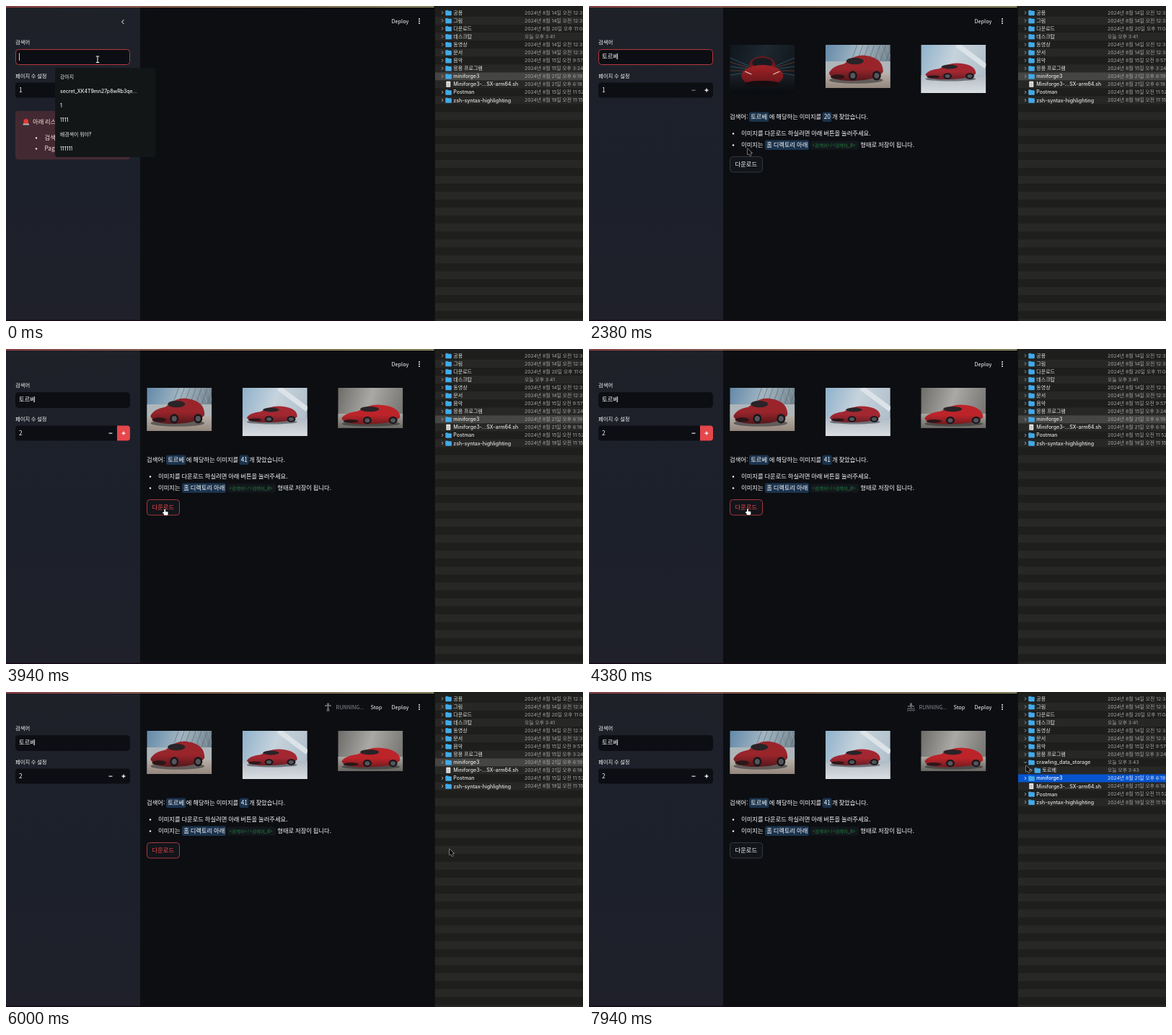
An HTML page with a canvas for the animation above (8000 ms loop, 800 px wide and 438 px high).

```html
<!DOCTYPE html>
<html lang="ko">
<head>
<meta charset="utf-8">
<style>
html, body { margin: 0; width: 100%; height: 100%; overflow: hidden; background: #0d0f14; }
canvas { display: block; width: 800px; height: 438px; }
</style>
</head>
<body>
<canvas id="stage"></canvas>
<script>
const W = 800, H = 438, LOOP = 8000;
const canvas = document.getElementById('stage');
const dpr = window.devicePixelRatio || 1;
canvas.width = W * dpr;
canvas.height = H * dpr;
const g = canvas.getContext('2d');
const APP = '"Noto Sans CJK KR", "Noto Sans CJK", sans-serif';
const SYS = 'Inter, "Noto Sans CJK KR", "Noto Sans CJK", sans-serif';
const MONO = '"Noto Sans Mono", "Noto Sans CJK KR", monospace';
const WHITE = '#fafafa', FIELD = '#0c0e13', BADGE = '#1b334d';
const QUERY = '토르베', STORE = 'crawling_data_storage';

// Event times in ms
const AT = { type: 120, submit: 1000, found: 1900, plus: 2900, more: 3750, download: 4550, folder: 6800, expand: 7500 };
const KEY_MS = 115;
const typed = ['', 'ㅌ', '토', '톨', '토르', '토릅', QUERY];

// Each move: start, end, goal
const moves = [
  [500, 1000, 166, 125], [1750, 2300, 220, 198], [2400, 2750, 165, 122], [3100, 3370, 225, 230],
  [3600, 4000, 220, 222], [4750, 5400, 640, 236], [5630, 6000, 615, 218], [6100, 7200, 606, 102]
];

const clamp = (v, lo, hi) => Math.max(lo, Math.min(hi, v));
const smooth = p => p * p * (3 - 2 * p);
function pointer(t) {
  const p = { x: 127, y: 74 };
  for (const [from, to, x, y] of moves) {
    const e = smooth(clamp((t - from) / (to - from), 0, 1));
    p.x += (x - p.x) * e;
    p.y += (y - p.y) * e;
  }
  return p;
}
const inside = (p, x, y, w, h) => p.x >= x && p.x <= x + w && p.y >= y && p.y <= y + h;

function rect(x, y, w, h, fill) { g.fillStyle = fill; g.fillRect(x, y, w, h); }
function round(x, y, w, h, r, fill, stroke) {
  g.beginPath();
  g.roundRect(x, y, w, h, r);
  g.fillStyle = fill;
  g.fill();
  if (stroke) { g.strokeStyle = stroke; g.lineWidth = 1; g.stroke(); }
}
function oval(x, y, rx, ry, fill) {
  g.beginPath();
  g.ellipse(x, y, rx, ry, 0, 0, 7);
  g.fillStyle = fill;
  g.fill();
}
const disc = (x, y, r, fill) => oval(x, y, r, r, fill);
function line(points, color, width) {
  g.beginPath();
  points.forEach(([x, y]) => g.lineTo(x, y));
  g.strokeStyle = color;
  g.lineWidth = width;
  g.stroke();
}
function chevron(x, y, r, angle, color) {
  g.save();
  g.translate(x, y);
  g.rotate(angle);
  line([[-r / 2, -r], [r / 2, 0], [-r / 2, r]], color, 1);
  g.restore();
}
// y is the vertical middle of the text
function text(s, x, y, size = 8.3, color = WHITE, family = APP, weight = 400) {
  g.font = `${weight} ${size}px ${family}`;
  g.fillStyle = color;
  g.fillText(s, x, y + size * 0.36);
}
function gradient(x0, y0, x1, y1, ...colors) {
  const f = g.createLinearGradient(x0, y0, x1, y1);
  colors.forEach((c, i) => f.addColorStop(i / (colors.length - 1), c));
  return f;
}

// Photos: soft backdrops 90 px wide with a simple car
function car(x, y, w, h, top, bottom) {
  g.save();
  g.translate(x, y);
  g.scale(w, h);
  oval(.5, .9, .5, .12, 'rgba(30,30,34,.5)');
  g.beginPath();
  g.moveTo(0, .65);
  g.quadraticCurveTo(.05, .4, .28, .32);
  g.quadraticCurveTo(.48, -.05, .7, .03);
  g.quadraticCurveTo(1, .12, 1, .6);
  g.quadraticCurveTo(.9, .9, .45, .92);
  g.quadraticCurveTo(.05, .95, 0, .65);
  g.fillStyle = gradient(0, 0, 0, 1, top, top, bottom);
  g.fill();
  oval(.48, .22, .16, .12, '#2a2327');
  oval(.16, .78, .13, .08, '#2c1518');
  for (const wheel of [.44, .88]) {
    oval(wheel, .74, 6 / w, .17, '#17171b');
    oval(wheel, .74, 3.5 / w, .1, '#55555b');
  }
  g.restore();
}
function backdrop(h, floor, wall, ground) {
  rect(0, 0, 90, h, gradient(0, 0, 90, h / 2, ...wall));
  rect(0, floor, 90, h - floor, gradient(0, floor, 0, h, ...ground));
}
function nightPhoto(h) {
  backdrop(h, 42, ['#10161d', '#1d2830', '#12171d'], ['#1a2027', '#090b0e']);
  for (let i = 0; i < 5; i++) {
    const y = 18 + i * 6, color = i % 2 ? '#6d3a30' : '#36586b';
    line([[0, y], [28, 30 + i * 2]], color, .8);
    line([[62, 30 + i * 2], [90, y]], color, .8);
  }
  oval(45, 28, 18, 12, '#6d191d');
  oval(45, 25, 14, 7, '#171c22');
  oval(45, 43, 29, 15, gradient(0, 28, 0, 58, '#a32226', '#5e1418'));
  oval(45, 54, 24, 4, '#150d10');
  for (const side of [-1, 1]) line([[45 + side * 15, 41], [45 + side * 24, 37]], '#e0c9c4', 1.2);
}
function glassPhoto(h) {
  backdrop(h, 39, ['#6389a9', '#a3b7c3', '#6d7d88'], ['#b8b2ab', '#94867c']);
  for (let x = 36; x < 90; x += 8) {
    line([[x, 0], [x + 8, 22]], '#9eacb3', .6);
    line([[x + 8, 0], [x, 22]], '#53626d', .6);
  }
  rect(0, 23, 90, 16, '#afb6ba');
  car(5, 14, 75, 39, '#99252b', '#481519');
}
function brightPhoto(h) {
  backdrop(h, 42, ['#8fb1cb', '#c6d3dc', '#b1c0cb'], ['#b2bbc5', '#d9dee2']);
  line([[50, 0], [90, 30]], '#dce3e8', 7);
  car(6, 25, 70, 25, '#a32731', '#601c24');
}
function grayPhoto(h) {
  backdrop(h, 36, ['#6d6c69', '#aaa9a5', '#777672'], ['#aaa7a2', '#696661']);
  car(5, 23, 81, 30, '#bd2429', '#641a1e');
}
const PHOTO_HEIGHT = new Map([[nightPhoto, 67], [glassPhoto, 60], [brightPhoto, 67], [grayPhoto, 56]]);
function photos(list) {
  list.forEach((photo, i) => {
    const h = PHOTO_HEIGHT.get(photo);
    g.save();
    g.translate(195.3 + i * 132.5, 54);
    g.beginPath();
    g.rect(0, 0, 90, h);
    g.clip();
    photo(h);
    g.restore();
  });
}

function bullet(s, y, x, dot, color = WHITE) {
  disc(dot, y + .5, 1.2, color);
  text(s, x, y, 8.3, color);
}

function notice() {
  const pink = '#ffdede';
  round(13, 146, 159, 67.5, 4, '#432a32');
  round(24.5, 157, 6.5, 7, [3.2, 3.2, 0, 0], '#e5392f');
  round(23.5, 163.4, 8.6, 2.2, .6, '#aeb4bd');
  text('아래 리스트를 확인해주세요.', 37, 161, 8.3, pink);
  bullet('검색어를 지정하였나요?', 183, 53.5, 42, pink);
  bullet('Page 수를 지정하였나요?', 198, 53.5, 42, pink);
}

function sidebar(t, p) {
  rect(0, 0, 186, H, gradient(0, 0, 0, H, '#1f2129', '#1c202b', '#1f202a'));
  if (p.x < 186) chevron(162, 22, 3, Math.PI, WHITE);

  text('검색어', 13, 50.5, 7.3);
  const focused = t < AT.plus;
  round(13.5, 60.5, 158, 21, 4, FIELD, focused ? '#b5383d' : FIELD);
  const value = typed[clamp(Math.ceil((t - AT.type) / KEY_MS), 0, typed.length - 1)];
  text(value, 18, 70.5);
  if (focused && Math.floor(t / 600) % 2 === 0) {
    rect(18.2 + g.measureText(value).width, 65.5, .8, 10.5, WHITE);
  }

  text('페이지 수 설정', 13, 97, 7.3);
  round(13, 106.5, 159, 21, 4, FIELD);
  const pages = t < AT.plus ? 1 : 2;
  text(pages, 18, 117.5);
  const hot = inside(p, 154, 106, 18, 22) || (t >= AT.plus && t < AT.download);
  if (hot) round(154, 106.5, 18, 21, [0, 4, 4, 0], '#e5474b');
  rect(142.5, 116.6, 5, 1.1, pages > 1 ? WHITE : '#85868a');
  rect(160.5, 116.5, 5, 1.3, WHITE);
  rect(162.4, 114.6, 1.3, 5, WHITE);

  if (t < AT.found) notice();
}

function suggestions() {
  round(68, 86, 139.5, 124, 4, '#121617');
  ['강아지', 'secret_XK4T9mn27p8wRb3qe...', '1', '1111', '배경색이 뭐야?', '111111']
    .forEach((s, i) => text(s, 75, 98.3 + i * 20, 6.9, '#eceeee', SYS, 500));
}

// Small figure cycling through swimmer, standing, runner, wheelchair
function athlete(kind) {
  const c = '#77797e';
  const limb = (y, angle, length) => line([[0, y], [Math.sin(angle) * length, y + Math.cos(angle) * length]], c, 1.4);
  const arm = [1.3, 1.57, .9, .7][kind], leg = [1, .25, .75, 1][kind];
  g.save();
  g.translate(446.5, 21);
  if (kind > 1) g.rotate(.25);
  disc(0, -4.3, 1.5, c);
  limb(-3, 0, 4.5);
  for (const side of [-1, 1]) {
    limb(-2, side * arm, 4.5);
    if (kind) limb(1, side * leg, 5);
  }
  if (kind === 0) for (const y of [2.2, 4.7]) {
    line(Array.from({ length: 12 }, (_, i) => [i - 5.5, y + Math.sin(i * 1.6) * .6]), c, 1);
  }
  if (kind === 3) {
    g.beginPath();
    g.arc(-.5, 2, 3.3, 0, 7);
    g.stroke();
  }
  g.restore();
}

function toolbar(t) {
  const running = (t >= AT.submit && t < AT.found) || (t >= AT.plus && t < AT.more) || t >= AT.download;
  if (running) {
    athlete(Math.floor(t / 180) % 4);
    text('RUNNING...', 457.5, 21, 7.3, '#8b8d92');
    text('Stop', 505.5, 21, 7.3);
  }
  text('Deploy', 534.5, 21, 7.3);
  for (const y of [18, 21, 24]) disc(573, y, .95, WHITE);
}

function badge(s, x, y, w) {
  round(x, y - 6.5, w, 13.5, 2.5, BADGE);
  text(s, x + 2.2, y);
}

function results(t, p) {
  const more = t >= AT.more;
  photos(more ? [glassPhoto, brightPhoto, grayPhoto] : [nightPhoto, glassPhoto, brightPhoto]);

  text('검색어:', 195, 154);
  badge(QUERY, 222, 154, 27.5);
  text('에 해당하는 이미지를', 249.8, 154);
  badge(more ? '41' : '20', 323.5, 154, 13);
  text('개 찾았습니다.', 337, 154);

  bullet('이미지를 다운로드 하실려면 아래 버튼을 눌러주세요.', 177, 211, 200);
  bullet('이미지는', 193, 211, 200);
  badge('홈 디렉토리 아래', 244, 193, 61);
  round(307, 187.5, 67, 12, 2.5, '#13181c');
  text('<검색어>/<검색어_0>', 309.5, 193.7, 6.2, '#23803f', MONO);
  text('형태로 저장이 됩니다.', 376.3, 193);

  const hot = inside(p, 195, 209, 46, 23) || (t >= AT.download && t < AT.expand);
  round(195.5, 209.5, 45, 21.5, 4, '#12151a', hot ? '#a5383d' : '#35373d');
  text('다운로드', 202.5, 220, 8.3, hot ? '#f0484a' : WHITE);
}

const day = (d, time) => `2024년 8월 ${d}일 ${time}`;
const files = [
  ['공용', day(14, '오전 12:32')], ['그림', day(14, '오전 12:32')], ['다운로드', day(20, '오후 11:04')],
  ['데스크탑', '오늘 오후 3:41'], ['동영상', day(14, '오전 12:32')], ['문서', day(14, '오전 12:32')],
  ['음악', day(15, '오전 9:57')], ['응용 프로그램', day(15, '오후 3:24')],
  ['miniforge3', day(21, '오후 6:19')], ['Miniforge3-...SX-arm64.sh', day(21, '오후 6:18')],
  ['Postman', day(15, '오전 11:52')], ['zsh-syntax-highlighting', day(19, '오전 11:15')]
];

function folder(x, y) {
  round(x, y - 3.6, 4, 3, .8, '#2f8fce');
  round(x, y - 2.7, 8.5, 6.5, .9, '#43aae9');
}
function script(x, y) {
  round(x + 1, y - 4, 6, 8, .6, '#e9e9e9');
  for (let i = 0; i < 3; i++) rect(x + 2.2, y - 2 + i * 1.8, 3.5, .6, '#909090');
}

function finder(t) {
  const ROW = 11.06, TOP = 3.8, today = '오늘 오후 3:43';
  const active = t >= AT.expand, rows = files.slice();
  if (t >= AT.folder) rows.splice(8, 0, [STORE, today]);
  if (active) rows.splice(9, 0, [QUERY, today, 1]);

  rect(594, 0, 206, H, '#1e1e1c');
  for (let y = TOP + ROW; y < H; y += 2 * ROW) rect(595, y, 205, ROW, '#272725');
  rect(593.5, 0, 1, H, '#0a0a0b');
  rows.forEach(([name, date, depth = 0], i) => {
    const y = TOP + (i + .5) * ROW, x = 609.3 + depth * 8.3;
    const picked = name === 'miniforge3', lit = picked && active;
    const faint = lit ? '#e1eaff' : '#a5a6a3';
    if (picked) rect(595, y - ROW / 2, 205, ROW, active ? '#0754cf' : '#454644');
    if (name.endsWith('.sh')) script(x, y);
    else {
      chevron(x - 4.3, y, 2, name === STORE && active ? Math.PI / 2 : 0, faint);
      folder(x, y);
    }
    text(name, x + 11, y, 7, lit ? '#fff' : '#e2e2e0', SYS, 500);
    text(date, 719, y, 6.8, faint, SYS);
  });
}

function beam() {
  for (const [color, width] of [['#111', 2.2], ['#fff', 1]]) {
    line([[0, -3.5], [0, 4]], color, width);
    for (const y of [-4, 4.5]) line([[-2.2, y], [2.2, y]], color, width);
  }
}
function hand() {
  for (const [color, grow] of [['#111', .7], ['#fff', 0]]) {
    const part = (x, y, w, h) => round(x - grow, y - grow, w + 2 * grow, h + 2 * grow, 1, color);
    part(-.9, 0, 1.7, 7);
    part(-1.5, 3.7, 5.8, 5);
    part(-3.2, 4.3, 3, 2);
  }
}
function arrow() {
  line([[0, 0], [0, 9], [2, 7.2], [3.4, 10.3], [5, 9.6], [3.7, 6.6], [6.3, 6.4], [0, 0]], '#f2f2f2', .9);
  g.fillStyle = '#080808';
  g.fill();
}
function cursor(p, t) {
  const press = inside(p, 136, 106, 36, 22) || (t >= AT.found && inside(p, 195, 209, 46, 23));
  g.save();
  g.translate(p.x, p.y);
  if (inside(p, 13, 59, 159, 23)) beam();
  else if (press) hand();
  else arrow();
  g.restore();
}

function draw(t) {
  const p = pointer(t);
  g.setTransform(dpr, 0, 0, dpr, 0, 0);
  rect(0, 0, W, H, '#0c0e12');
  sidebar(t, p);
  toolbar(t);
  if (t >= AT.found) results(t, p);
  if (t < AT.type) suggestions();
  rect(0, .5, 594, 1.5, gradient(0, 0, 594, 0, '#b04a4c', '#b58a68', '#b5b17c'));
  finder(t);
  rect(0, 436.5, 594, 1.5, '#160a16');
  cursor(p, t);
}

const start = performance.now();
function tick() {
  draw((performance.now() - start) % LOOP);
  requestAnimationFrame(tick);
}
tick();
</script>
</body>
</html>
```
